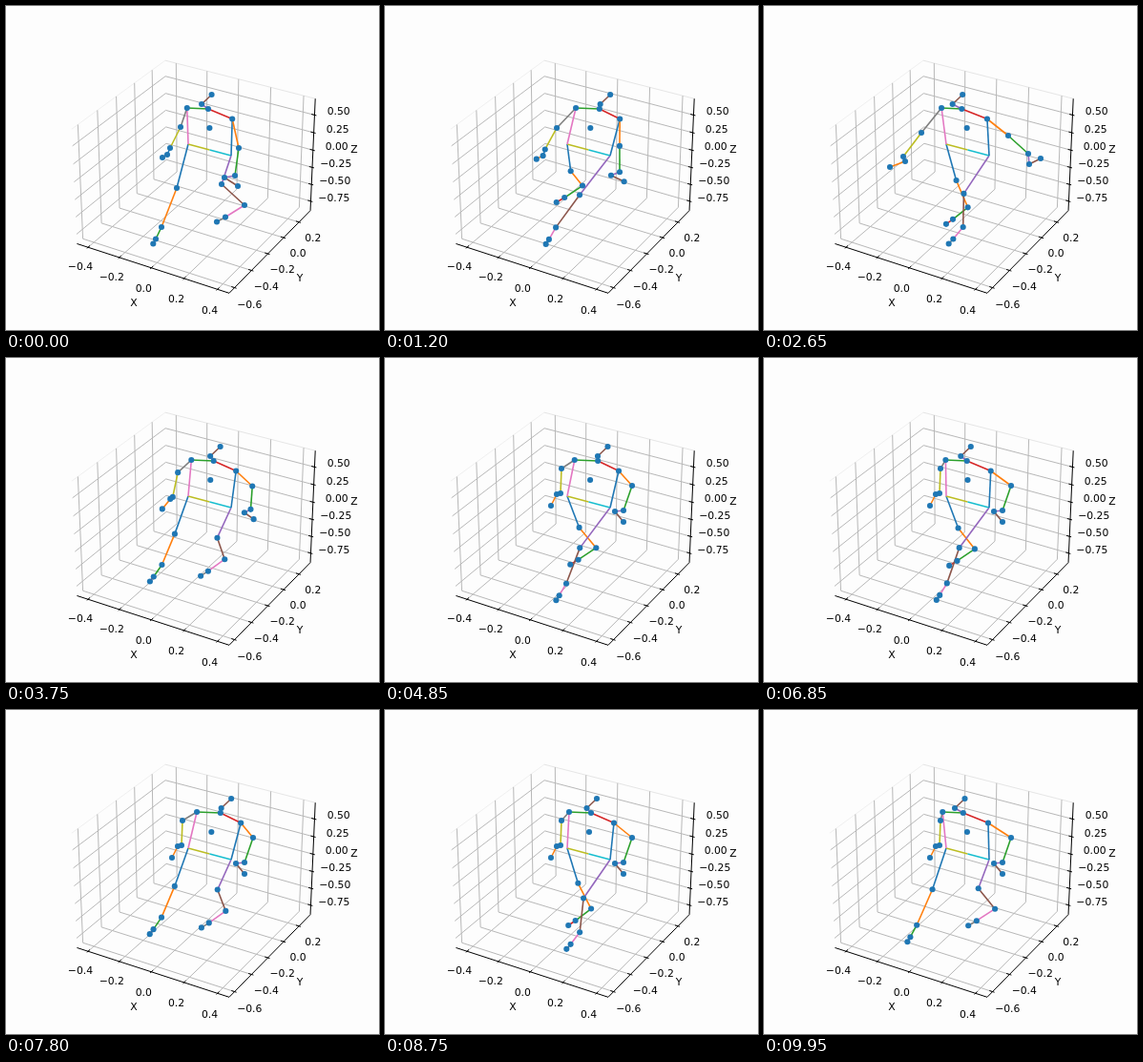
Recreate the animation shown at these times as an HTML page with a canvas. Size 391x340 px, loop 10000 ms.

```html
<!DOCTYPE html>
<html lang="en">
<head>
<meta charset="utf-8">
<title>Walking skeleton</title>
<style>
  html, body { margin: 0; width: 100%; height: 100%; overflow: hidden; background: #fdfdfd; }
  canvas { display: block; }
</style>
</head>
<body>
<canvas id="stage" width="391" height="340"></canvas>
<script>
const ctx = document.getElementById('stage').getContext('2d');
const LOOP = 10000, STEP = 50;
const [BLUE, ORANGE, GREEN, RED, PURPLE, BROWN, PINK, GRAY, OLIVE, CYAN] =
  ['#1f77b4', '#ff7f0e', '#2ca02c', '#d62728', '#9467bd',
   '#8c564b', '#e377c2', '#7f7f7f', '#bcbd22', '#17becf'];

// ---- Math helpers ----
const add = ([x, y], dx, dy) => [x + dx, y + dy];
const mix = (a, b, k) => a + (b - a) * k;
const mixPoses = (a, b, k) => a.map((p, i) => p.map((v, j) => mix(v, b[i][j], k)));
const turn = (t, period) => t / period * 2 * Math.PI;
const smooth = (t, from, to) => {
  const u = Math.min(1, Math.max(0, (t - from) / (to - from)));
  return u * u * (3 - 2 * u);
};

// ---- Motion ----
const STRIDE = 2020, ARM_SWING = 1060, SWAY = 3400;
const leftHip = [191, 145], pelvis = [213.5, 151], rightHip = [236, 157];

// A joint circles its centre: `reach` at the start of a stride, `lift` a quarter later
const orbit = (center, reach, lift, angle) =>
  center.map((c, i) => c + reach[i] * Math.cos(angle) + lift[i] * Math.sin(angle));

// The foot points further down the more the leg is in front
function leg(knee, ankle, front) {
  const dx = -13 + 7 * front, dy = 12.5;
  const foot = add(ankle, dx, dy);
  return [knee, ankle, foot, add(foot, dx * .45, dy * .4)];
}

function legs(t) {
  const angle = turn(t, STRIDE), front = Math.cos(angle);
  return {
    left: leg(orbit([190, 182.5], [-11, 8.5], [8, 4], angle),
              orbit([191, 211], [-28, 21], [13, 9], angle), front),
    right: leg(orbit([214, 193.5], [12, -6.5], [0, 1], angle),
               orbit([214, 223], [36, -14], [9, 4], angle), -front)
  };
}

// Elbow, wrist, hand, fingertip
const leftArm = {
  down: [[183, 127], [172, 149], [169, 156], [164, 159]],
  out: [[165, 133], [146, 158], [148, 163], [132, 169]],
  rest: [[185, 116], [184, 142], [180, 143], [174, 155]]
};
const rightArm = {
  down: [[244, 149], [240, 178], [229, 180], [243, 189]],
  out: [[256, 136], [277, 155], [278, 166], [290, 160]],
  rest: [[259, 134], [250, 160], [241, 161], [250, 172]]
};
// The arms flap between down and out, then settle
function arm({ down, out, rest }, t) {
  const flap = (1 - Math.cos(turn(t, ARM_SWING))) / 2;
  return mixPoses(mixPoses(down, out, flap), rest, smooth(t, 2700, 4250));
}

function torso(t) {
  const sway = 9 * Math.cos(turn(t - 1100, SWAY));
  const chest = [216 + sway, 108];
  const neck = add(chest, -4.5 + .6 * sway, -5);
  return {
    shoulderL: [193 + .8 * sway, 107], chest, shoulderR: [240 + .7 * sway, 118.5],
    neck, head: add(neck, 10.5, -10), spine: [214 + .15 * sway, 128]
  };
}

// ---- Drawing helpers ----
function line(a, b, color, width) {
  ctx.strokeStyle = color;
  ctx.lineWidth = width;
  ctx.beginPath();
  ctx.moveTo(...a);
  ctx.lineTo(...b);
  ctx.stroke();
}
function chain(points, colors) {
  colors.forEach((color, i) => line(points[i], points[i + 1], color, 1.6));
}
function dot([x, y]) {
  ctx.beginPath();
  ctx.arc(x, y, 3.05, 0, 7);
  ctx.fill();
}

// ---- Axes: perspective view of a box, coordinates as fractions 0..1 ----
function project([x, y, z]) {
  const X = (x - .5) * 8 / 7, Y = (y - .5) * 8 / 7, Z = (z - .5) * 6 / 7;
  const k = 1600 / (10 - .433 * X + .75 * Y - .5 * Z);
  return [198.9 + k * (.866 * X + .5 * Y), 173.6 - k * (-.25 * X + .433 * Y + .866 * Z)];
}
const edge = (a, b, color, width) => line(project(a), project(b), color, width);
const axes = [
  { min: -.4715, max: .4695, first: -.4, step: .2, count: 5, digits: 1,
    at: s => [s, 0, 0], wall: s => [[s, 0, 0], [s, 1, 0], [s, 1, 1]],
    tick: (s, d) => [s, -d, 0], label: s => [s, -.085, -.122] },
  { min: -.662, max: .353, first: -.6, step: .2, count: 5, digits: 1,
    at: s => [1, s, 0], wall: s => [[1, s, 0], [0, s, 0], [0, s, 1]],
    tick: (s, d) => [1 + d, s, 0], label: s => [1.095, s, -.11] },
  { min: -.89, max: .728, first: -.75, step: .25, count: 6, digits: 2,
    at: s => [1, 1, s], wall: s => [[0, 0, s], [0, 1, s], [1, 1, s]],
    tick: (s, d) => [1 + d, 1, s], label: s => [1.105, 1.1, s] }
];

function drawAxes() {
  ctx.font = '10.8px "DejaVu Sans", sans-serif';
  ctx.textAlign = 'center';
  ctx.textBaseline = 'middle';
  edge([0, 0, 1], [0, 1, 1], '#f0f0f0', 1);
  edge([0, 1, 1], [1, 1, 1], '#e6e6e6', 1);
  const ticks = axes.flatMap(axis => Array.from({ length: axis.count }, (_, i) => {
    const value = axis.first + i * axis.step;
    return { axis, value, s: (value - axis.min) / (axis.max - axis.min) };
  }));
  for (const { axis, s } of ticks) {
    const [a, b, c] = axis.wall(s);
    edge(a, b, '#b8b8b8', 1);
    edge(b, c, '#b8b8b8', 1);
  }
  for (const axis of axes) edge(axis.at(0), axis.at(1), '#000', 1);
  ctx.fillStyle = '#000';
  for (const { axis, value, s } of ticks) {
    edge(axis.tick(s, .012), axis.tick(s, -.02), '#000', 1);
    const sign = value < -.01 ? '\u2212' : '';
    ctx.fillText(sign + Math.abs(value).toFixed(axis.digits), ...project(axis.label(s)));
  }
  ctx.fillText('X', 134, 312);
  ctx.fillText('Y', 308, 286);
  ctx.fillText('Z', 365, 151);
}

function drawSkeleton(t) {
  const { left, right } = legs(t);
  const armL = arm(leftArm, t), armR = arm(rightArm, t);
  const body = torso(t);
  const { shoulderL, chest, shoulderR, neck, head } = body;

  chain([leftHip, ...left], [BLUE, ORANGE, GREEN, RED]);
  chain([rightHip, ...right], [PURPLE, BROWN, PINK, GRAY]);
  chain([leftHip, pelvis, rightHip, shoulderR], [OLIVE, CYAN, BLUE]);
  chain([shoulderR, ...armR], [ORANGE, GREEN, PURPLE, BROWN]);
  chain([leftHip, shoulderL, ...armL], [PINK, GRAY, OLIVE, BLUE, ORANGE]);
  chain([shoulderL, chest, shoulderR], [GREEN, RED]);
  chain([chest, neck, head], [PURPLE, BROWN]);

  ctx.fillStyle = BLUE;
  [...left, ...right, ...armL, ...armR, ...Object.values(body)].forEach(dot);
}

function draw() {
  const t = Math.floor(performance.now() % LOOP / STEP) * STEP;
  ctx.fillStyle = '#fdfdfd';
  ctx.fillRect(0, 0, 391, 340);
  drawAxes();
  drawSkeleton(t);
  requestAnimationFrame(draw);
}
draw();
</script>
</body>
</html>
```
